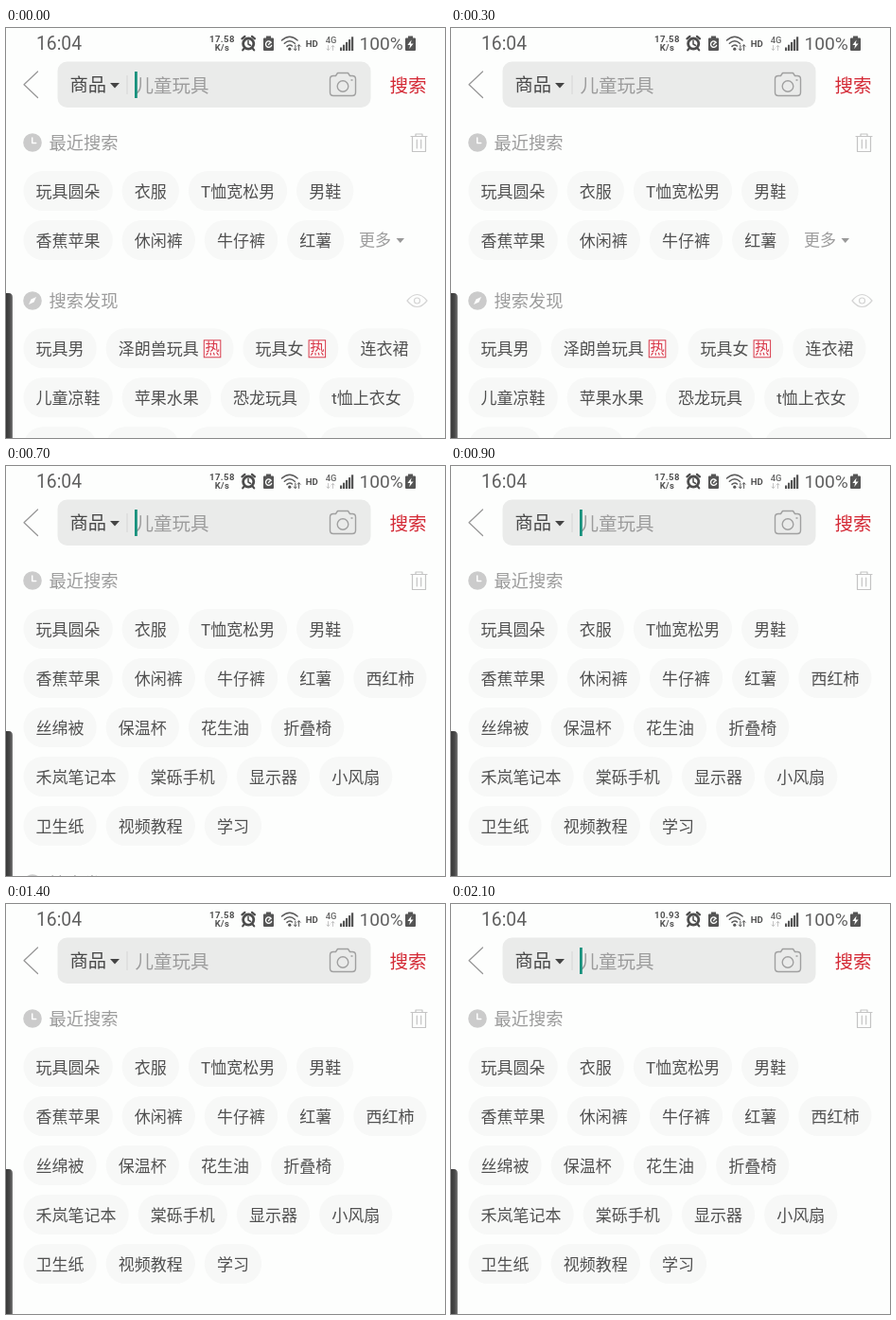
An HTML page that plays this animation: 464 by 433 pixels, repeating every 2.2 s.

```html
<!DOCTYPE html>
<html lang="zh-CN">
<head>
<meta charset="utf-8">
<title>搜索</title>
<style>
html, body { margin: 0; width: 100%; height: 100%; overflow: hidden; background: #fdfefd; }
svg { display: block; width: 464px; height: 433px; }
text { font-family: Roboto, "Noto Sans CJK SC", "Noto Sans CJK", sans-serif; fill: #505050; }
.line { fill: none; stroke-linecap: round; stroke-linejoin: round; }
</style>
</head>
<body>
<svg id="stage" viewBox="0 0 464 433">
  <defs>
    <linearGradient id="edge">
      <stop offset="0" stop-color="#383838"/>
      <stop offset=".6" stop-color="#4a4a4a"/>
      <stop offset="1" stop-color="#7c7c7c"/>
    </linearGradient>
  </defs>
  <rect width="464" height="433" fill="#fdfefd"/>

  <g id="status" fill="#555">
    <text x="32" y="23.4" font-size="19.3" style="fill:#606060">16:04</text>
    <g font-weight="700" text-anchor="middle">
      <text id="speed" x="228.4" y="15" font-size="9.6" letter-spacing=".4">17.58</text>
      <text x="228.4" y="24.3" font-size="9.4" letter-spacing=".4">K/s</text>
      <text x="323.3" y="19.6" font-size="9.6">HD</text>
      <text x="343.5" y="15.6" font-size="9.4" style="fill:#666;font-weight:500">4G</text>
    </g>
    <!-- alarm -->
    <g class="line" stroke="#4c4c4c">
      <circle cx="256.2" cy="16.6" r="5.6" stroke-width="2.8"/>
      <path d="M256 13.5v3.500l2.600 1.500" stroke-width="1.500"/>
      <path d="M249.400 11.400l3-2.600M263 11.400l-3-2.600M251.600 21.600l-1.400 1.800M260.800 21.600l1.400 1.800" stroke-width="2.200"/>
    </g>
    <!-- battery saver -->
    <path d="M275 8.5h5v2h2a1 1 0 0 1 1 1V23a1 1 0 0 1-1 1h-9a1 1 0 0 1-1-1V11.500a1 1 0 0 1 1-1h2z"/>
    <path class="line" d="M280.300 15.300a3.200 3.200 0 1 0 .4 3M277.500 17.500l2-2" stroke="#fdfefd" stroke-width="1.300"/>
    <!-- wifi -->
    <g class="line" stroke="#5a5a5a" stroke-width="1.500">
      <path d="M291.500 13q8.300-7.500 16.600 0M294.300 16.300q5.500-5 11 0M297 19.400q2.800-2.600 5.400-.4"/>
      <path d="M305.800 18v5.500M304.300 22l1.500 1.600 1.500-1.600M309.600 23.500V18M308.100 19.300l1.500-1.600 1.500 1.600" stroke-width="1"/>
    </g>
    <circle cx="299.800" cy="22.200" r="1.600"/>
    <path class="line" d="M340.500 18.500v5M339 22l1.500 1.600 1.500-1.600M345.500 23.500v-5M344 20l1.500-1.600 1.500 1.600" stroke="#c4c4c4"/>
    <g id="bars"></g>
    <text x="373.500" y="23.400" font-size="19.200" style="fill:#606060">100%</text>
    <path d="M425 8.500h5v2h2a1 1 0 0 1 1 1V23a1 1 0 0 1-1 1h-9a1 1 0 0 1-1-1V11.500a1 1 0 0 1 1-1h2z"/>
    <path d="M428.600 12.500l-4.200 5.600h2.700l-.8 4 4.300-5.700h-2.800z" fill="#fdfefd"/>
  </g>

  <path class="line" d="M33.500 46L19 59.800l14.500 13.700" stroke="#959595" stroke-width="1.200"/>
  <rect x="54.500" y="35.500" width="331" height="48.500" rx="10" fill="#eaebea"/>
  <path d="M110 58h10l-5 5.500z" fill="#444"/>
  <path d="M128 50v20" stroke="#d6d6d6"/>
  <g class="line" stroke="#a0a0a0" stroke-width="1.400">
    <path d="M346 50.500h2.500l2-3h11l2 3h2.500q3.500 0 3.500 3.500v14q0 3.500-3.500 3.500h-20q-3.500 0-3.500-3.500V54q0-3.500 3.500-3.500z"/>
    <circle cx="356" cy="61.500" r="5.800"/>
    <path d="M365 55h1"/>
  </g>
  <g id="field"></g>
  <rect id="caret" x="136" y="46" width="2.800" height="28" fill="#17917d"/>

  <circle cx="28" cy="121" r="9.800" fill="#cbcbcb"/>
  <path class="line" d="M27.700 116v5.500h4" stroke="#fff" stroke-width="1.500"/>
  <path class="line" d="M428 114.500h17M433 114v-2h7v2M429.500 115v15.500h14V115M434.300 118v9M438.700 118v9" stroke="#c4c4c4" stroke-width="1.200"/>
  <g id="recent"></g>
  <g id="folded">
    <path d="M412.500 222h8.500l-4.250 5z" fill="#999"/>
  </g>
  <g id="unfolded"></g>
  <g id="discover">
    <circle cx="28" cy="288" r="9.800" fill="#cbcbcb"/>
    <path d="M32 284l-2.500 5.500-5.500 2.500 2.500-5.500z" fill="#fff"/>
    <g class="line" stroke="#d4d4d4" stroke-width="1.200">
      <path d="M424 288q10.500-13 21 0q-10.500 13-21 0z"/>
      <circle cx="434.500" cy="288" r="3"/>
    </g>
  </g>
  <path d="M0 280h3q4 0 4 4.500V433H0z" fill="url(#edge)"/>
</svg>
<script>
const LOOP = 2200, OPEN = 700, SETTLE = 800, SPEED_CHANGE = 1600;
const BLINK = 500, BLINK_START = 200;
const FONT = 17, PAD = 13.1, GAP = 10, BADGE = 23.6, RED = '#d8394a';
const $ = id => document.getElementById(id);

function add(parent, tag, attrs, label) {
  const el = document.createElementNS('http://www.w3.org/2000/svg', tag);
  for (const key in attrs) el.setAttribute(key, attrs[key]);
  if (label) el.textContent = label;
  parent.appendChild(el);
  return el;
}

// Places text by its left edge and vertical middle.
function write(parent, label, x, mid, size, color) {
  add(parent, 'text', { x, y: mid + size * 0.38, 'font-size': size, style: `fill:${color}` }, label);
}

const textWidth = label => [...label].reduce(
  (sum, ch) => sum + (ch === 'T' ? 10 : ch === 't' ? 6 : FONT), 0);

// A trailing * marks a chip with the red badge.
function chips(parent, mid, labels, x = 18.5) {
  for (const entry of labels.split(' ')) {
    const hot = entry.endsWith('*');
    const label = hot ? entry.slice(0, -1) : entry;
    const inner = textWidth(label);
    const width = inner + 2 * PAD + (hot ? BADGE : 0);
    add(parent, 'rect', { x, y: mid - 21, width, height: 42, rx: 20.5, fill: '#f7f8f7' });
    write(parent, label, x + PAD, mid + .3, FONT, '#505050');
    if (hot) {
      const left = x + PAD + inner + 5.5;
      add(parent, 'rect', { x: left, y: mid - 8.5, width: 17.5, height: 18, fill: '#fdf7f7', stroke: RED });
      write(parent, '热', left + 1, mid + .3, 15.5, RED);
    }
    x += width + GAP;
  }
  return x;
}

for (let i = 0; i < 5; i++) {
  const height = 3.5 + i * 2.8;
  add($('bars'), 'rect', { x: 353 + i * 3, y: 24 - height, width: 2.2, height });
}

write($('field'), '商品', 67.5, 60, 19.3, '#484848');
write($('field'), '儿童玩具', 136.5, 60.5, 19.5, '#9c9c9c');
write($('field'), '搜索', 405.5, 60.5, 19.5, '#d42a36');

write($('recent'), '最近搜索', 45.5, 121.5, 18.3, '#9c9c9c');
chips($('recent'), 172, '玩具圆朵 衣服 T恤宽松男 男鞋');
const rowEnd = chips($('recent'), 224, '香蕉苹果 休闲裤 牛仔裤 红薯');
write($('folded'), '更多', 373, 224, FONT, '#9c9c9c');

chips($('unfolded'), 224, '西红柿', rowEnd);
chips($('unfolded'), 276, '丝绵被 保温杯 花生油 折叠椅');
chips($('unfolded'), 328, '禾岚笔记本 棠砾手机 显示器 小风扇');
chips($('unfolded'), 380, '卫生纸 视频教程 学习');

write($('discover'), '搜索发现', 45.5, 288, 18.3, '#9c9c9c');
chips($('discover'), 338.3, '玩具男 泽朗兽玩具* 玩具女* 连衣裙');
chips($('discover'), 390.3, '儿童凉鞋 苹果水果 恐龙玩具 t恤上衣女');
chips($('discover'), 442.3, '运动鞋 双肩包 儿童积木套装 夏季连衣裙');

function show(id, on) {
  $(id).style.display = on ? '' : 'none';
}

const start = performance.now();

function draw(now) {
  const t = Math.max(0, now - start) % LOOP;
  const open = t >= OPEN;
  show('folded', !open);
  show('unfolded', open);
  show('discover', t < SETTLE);
  $('discover').setAttribute('transform', `translate(0 ${open ? 153 : 0})`);
  show('caret', Math.floor((t - BLINK_START) / BLINK) % 2 !== 0);
  $('speed').textContent = t < SPEED_CHANGE ? '17.58' : '10.93';
  requestAnimationFrame(draw);
}
draw(start);
</script>
</body>
</html>
```
